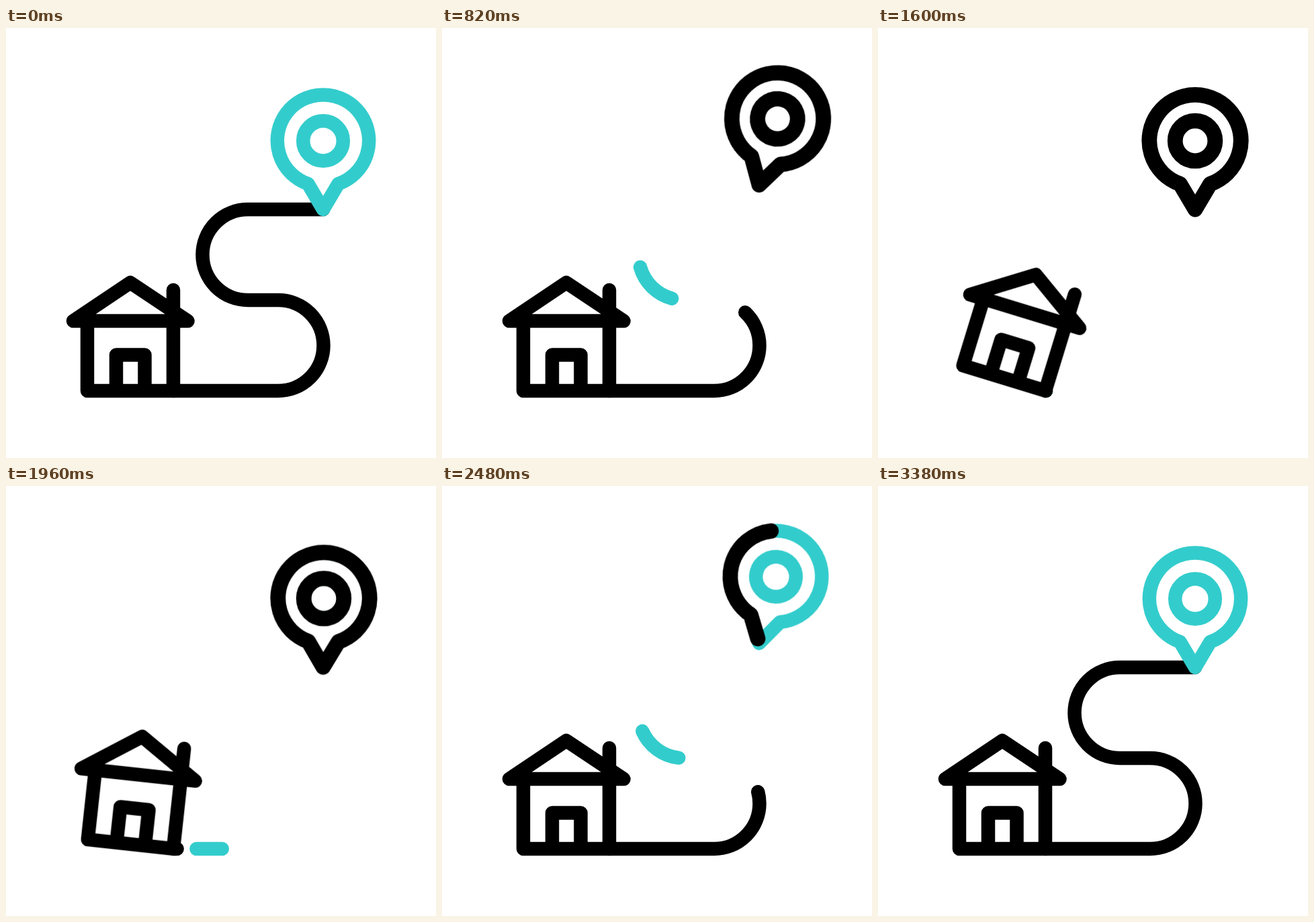
An HTML page without scripts for the animation above (3.6 s loop, 640 by 640 pixels).

```html
<!DOCTYPE html>
<html lang="en">
<head>
<meta charset="utf-8">
<title>Route from home to pin</title>
<style>
  html, body { margin: 0; width: 100%; height: 100%; overflow: hidden; background: #fff; }
  svg { display: block; width: 100%; height: 100%; }
  .line { fill: none; stroke: #000; stroke-width: 20.5; stroke-linecap: round; stroke-linejoin: round; }
  .teal { stroke: #33cccc; }
  .bold { stroke-width: 22.8; }
  .line, .house, .pin { animation: 3600ms linear infinite; }
  .house { transform-origin: 249.5px 540px; animation-name: tilt; }
  .pin { transform-origin: 472px 270px; animation-name: hop; }
  .road { animation-name: retract; }
  .dash { animation-name: travel; }
  .outer { animation-name: outer; }
  .inner { animation-name: inner; }

  @keyframes retract {
    0%, 92%, 100% { stroke-dasharray: 740px 2000px; }
    5% { stroke-dasharray: 711px 2000px; }
    10% { stroke-dasharray: 638px 2000px; }
    15% { stroke-dasharray: 519px 2000px; }
    22.8% { stroke-dasharray: 316px 2000px; }
    27.8% { stroke-dasharray: 185px 2000px; }
    32% { stroke-dasharray: 86px 2000px; }
    36.7% { stroke-dasharray: 10px 2000px; }
    41%, 52% { stroke-dasharray: 0px 2000px; }
    54.4% { stroke-dasharray: 4px 2000px; }
    56.7% { stroke-dasharray: 24px 2000px; }
    60% { stroke-dasharray: 76px 2000px; }
    63.9% { stroke-dasharray: 161px 2000px; }
    68.9% { stroke-dasharray: 278px 2000px; }
    75% { stroke-dasharray: 411px 2000px; }
    78.3% { stroke-dasharray: 496px 2000px; }
    83.3% { stroke-dasharray: 626px 2000px; }
    86.9% { stroke-dasharray: 701px 2000px; }
  }
  @keyframes travel {
    0%, 8.3%, 82.8%, 100% { stroke-dasharray: 0px 2000px; stroke-dashoffset: -736px; }
    11.1% { stroke-dasharray: 15px 2000px; stroke-dashoffset: -716px; }
    13.9%, 78.3% { stroke-dasharray: 35px 2000px; stroke-dashoffset: -672px; }
    18.3% { stroke-dasharray: 55px 2000px; stroke-dashoffset: -566px; }
    22.8% { stroke-dasharray: 69px 2000px; stroke-dashoffset: -430px; }
    27.8% { stroke-dasharray: 68px 2000px; stroke-dashoffset: -268px; }
    32.2% { stroke-dasharray: 58px 2000px; stroke-dashoffset: -138px; }
    36.7% { stroke-dasharray: 42px 2000px; stroke-dashoffset: -42px; }
    39.4% { stroke-dasharray: 25px 2000px; stroke-dashoffset: -11px; }
    42.2%, 48.9% { stroke-dasharray: 0px 2000px; stroke-dashoffset: 0px; }
    51.7% { stroke-dasharray: 21px 2000px; stroke-dashoffset: -7px; }
    54.4% { stroke-dasharray: 38px 2000px; stroke-dashoffset: -32px; }
    58.9% { stroke-dasharray: 60px 2000px; stroke-dashoffset: -121px; }
    63.9% { stroke-dasharray: 70px 2000px; stroke-dashoffset: -266px; }
    68.9% { stroke-dasharray: 70px 2000px; stroke-dashoffset: -419px; }
    73.9% { stroke-dasharray: 60px 2000px; stroke-dashoffset: -561px; }
    80.6% { stroke-dasharray: 17px 2000px; stroke-dashoffset: -711px; }
  }
  @keyframes hop {
    0%, 7%, 33.5%, 41%, 50%, 93.9%, 100% { transform: translateY(0) rotate(0); }
    2%, 90% { transform: translateY(0) rotate(1.4deg); }
    12.5%, 78.3% { transform: translateY(0) rotate(-1deg); }
    15% { transform: translateY(-20px) rotate(12deg); }
    17%, 66% { transform: translateY(-36px) rotate(15.3deg); }
    22.8% { transform: translateY(-36.5px) rotate(15.6deg); }
    25.5% { transform: translateY(-30px) rotate(13.5deg); }
    30% { transform: translateY(-.5px) rotate(3.4deg); }
    36.7% { transform: translateY(0) rotate(-1.4deg); }
    54.4% { transform: translateY(-.5px) rotate(.5deg); }
    60% { transform: translateY(-4px) rotate(5.6deg); }
    63% { transform: translateY(-20px) rotate(11.5deg); }
    68.9% { transform: translateY(-36px) rotate(14.2deg); }
    75% { transform: translateY(-36px) rotate(15deg); }
  }
  @keyframes tilt {
    0%, 28.5%, 62%, 100% { transform: rotate(0); }
    30% { transform: rotate(1deg); }
    33% { transform: rotate(9deg); }
    36.7% { transform: rotate(16.3deg); }
    40%, 46% { transform: rotate(17deg); }
    50% { transform: rotate(13.5deg); }
    54.4% { transform: rotate(6.3deg); }
    57.5% { transform: rotate(2deg); }
    60% { transform: rotate(.4deg); }
  }
  /* Black overlay grows from the tip, then shrinks back to show the teal pin. */
  @keyframes outer {
    0%, 15%, 72%, 100% { stroke-dasharray: 0px 2000px; stroke-dashoffset: -20px; opacity: 0; }
    15.1%, 71.9% { stroke-dasharray: 1px 2000px; stroke-dashoffset: -20px; opacity: 1; }
    20.5%, 66% { stroke-dasharray: 472px 2000px; stroke-dashoffset: 0px; opacity: 1; }
    68.9% { stroke-dasharray: 205px 2000px; stroke-dashoffset: -7px; opacity: 1; }
  }
  @keyframes inner {
    0%, 15%, 68.5%, 100% { stroke-dasharray: 0px 2000px; opacity: 0; }
    15.1%, 68.4% { stroke-dasharray: 1px 2000px; opacity: 1; }
    20%, 65% { stroke-dasharray: 190px 2000px; opacity: 1; }
  }
</style>
</head>
<body>
<svg viewBox="0 0 640 640">
  <defs>
    <path id="route" d="M250 540H405A67.5 67.5 0 0 0 405 405H360A67.5 67.5 0 0 1 360 270H472"/>
    <path id="drop" d="M472 270L449.5 232A68.2 68.2 0 1 1 494.5 232Z"/>
    <circle id="eye" cx="472" cy="168" r="29.8"/>
  </defs>
  <use href="#route" class="line teal dash"/>
  <use href="#route" class="line road"/>
  <g class="house">
    <path class="line" d="M121 440V540H249V390M100 436L185 379L270.5 436ZM164 540V486.5H206.5V540"/>
  </g>
  <g class="pin">
    <use href="#drop" class="line teal"/>
    <use href="#eye" class="line teal"/>
    <use href="#drop" class="line bold outer"/>
    <use href="#eye" class="line bold inner"/>
  </g>
</svg>
</body>
</html>
```
